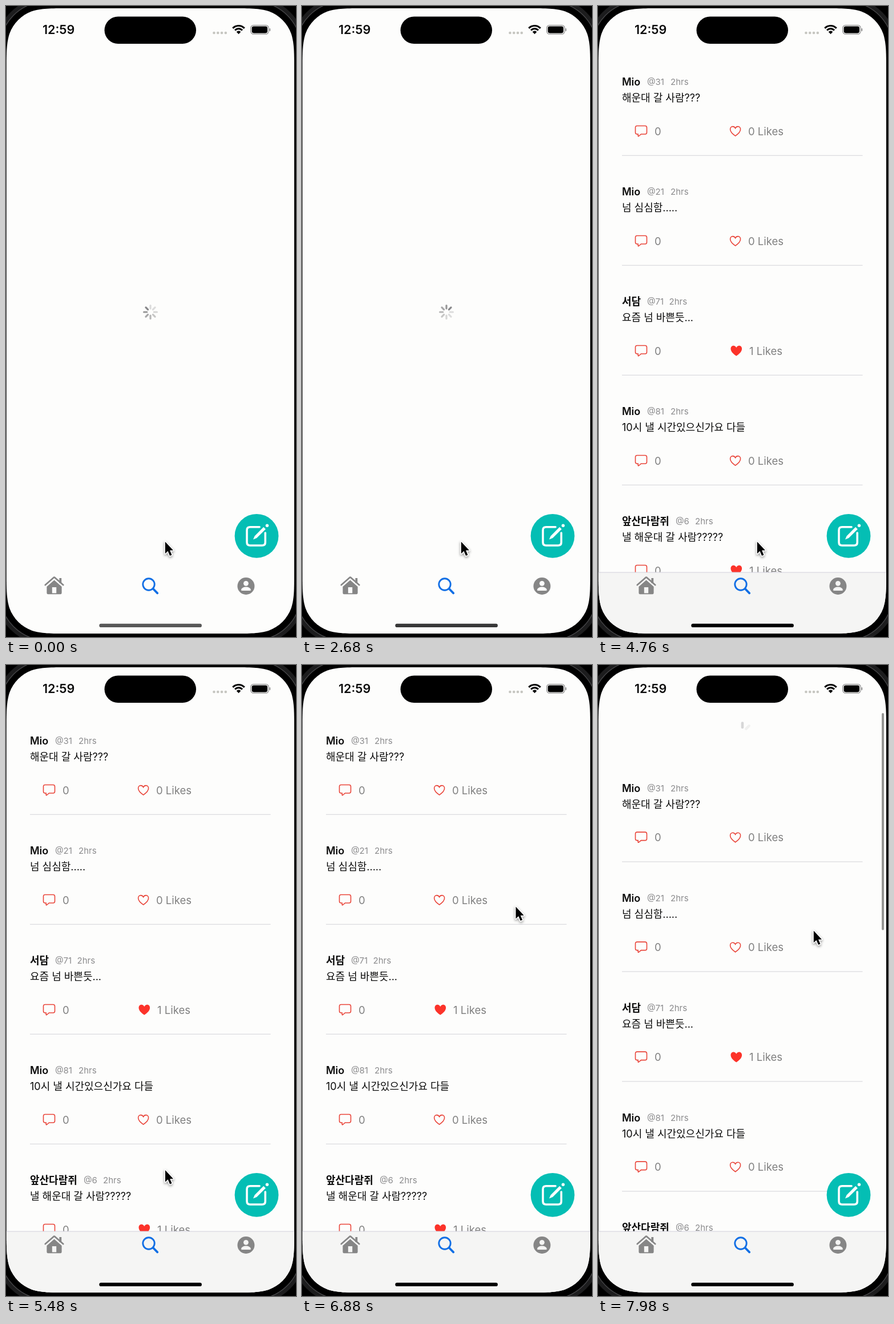
Animation, 508 px wide and 1103 px high, one loop 8000 ms. Source, as an HTML page with a canvas:

```html
<!DOCTYPE html>
<html lang="ko">
<head>
<meta charset="utf-8">
<title>Feed</title>
<style>
html, body { margin: 0; width: 100%; height: 100%; overflow: hidden; background: #000; }
canvas { display: block; width: 508px; height: 1103px; }
</style>
</head>
<body>
<canvas id="stage"></canvas>
<script>
const W = 508, H = 1103, LOOP = 8000;
const LIST_AT = 4500, LOADED_AT = 4060;
const PAPER = '#fdfdfc', GRAY = '#868686', RED = '#e9453a';
const FONT = 'Inter, "Noto Sans CJK KR", "Noto Sans CJK", sans-serif';

const canvas = document.getElementById('stage');
const ctx = canvas.getContext('2d');
const dpr = window.devicePixelRatio || 1;
canvas.width = W * dpr;
canvas.height = H * dpr;

const posts = [
  { name: 'Mio', id: '@31', idX: 86, timeX: 127, text: '해운대 갈 사람???', likes: 0 },
  { name: 'Mio', id: '@21', idX: 86, timeX: 127, text: '넘 심심함.....', likes: 0 },
  { name: '서담', id: '@71', idX: 86, timeX: 124.5, text: '요즘 넘 바쁜듯...', likes: 1 },
  { name: 'Mio', id: '@81', idX: 86, timeX: 127, text: '10시 낼 시간있으신가요 다들', likes: 0 },
  { name: '앞산다람쥐', id: '@6', idX: 136, timeX: 170, text: '낼 해운대 갈 사람?????', likes: 1 }
];

// Keys are [time, value, ...]
const pointerKeys = [
  [0, 278, 935], [4950, 278, 935], [5480, 278, 882], [6280, 357, 503],
  [7000, 377, 405], [7420, 377, 405], [7540, 377, 420], [7980, 377, 463], [8000, 377, 465]
];
const pullKeys = [[0, 0], [7420, 0], [7540, 15], [7980, 82.5], [8000, 85]];

const clamp = (v, a = 0, b = 1) => Math.min(b, Math.max(a, v));

function sample(keys, t) {
  let i = 1;
  while (i < keys.length - 1 && keys[i][0] < t) i++;
  const a = keys[i - 1], b = keys[i];
  const p = clamp((t - a[0]) / (b[0] - a[0]));
  return a.slice(1).map((v, k) => v + (b[k + 1] - v) * p);
}

function box(x, y, w, h, r, color) {
  ctx.beginPath();
  ctx.roundRect(x, y, w, h, r);
  ctx.fillStyle = color;
  ctx.fill();
}

function disc(x, y, r, color) {
  ctx.beginPath();
  ctx.arc(x, y, r, 0, Math.PI * 2);
  ctx.fillStyle = color;
  ctx.fill();
}

function stroke(color, width, path) {
  ctx.strokeStyle = color;
  ctx.lineWidth = width;
  path ? ctx.stroke(path) : ctx.stroke();
}

function label(str, x, y, size, color, weight = 400) {
  ctx.font = `${weight} ${size}px ${FONT}`;
  ctx.fillStyle = color;
  ctx.fillText(str, x, y);
}

// Rectangle with continuous-curvature corners
function softRect(l, t, r, b, radius) {
  const path = new Path2D();
  // (dx, dy) runs into the corner, (-dy, dx) runs out of it
  function corner(x, y, dx, dy) {
    const at = (a, c) => [x - (dx * a + dy * c) * radius, y - (dy * a - dx * c) * radius];
    path.lineTo(...at(1.529, 0));
    path.bezierCurveTo(...at(1.088, 0), ...at(0.868, 0), ...at(0.631, 0.075));
    path.bezierCurveTo(...at(0.373, 0.169), ...at(0.169, 0.373), ...at(0.075, 0.631));
    path.bezierCurveTo(...at(0, 0.868), ...at(0, 1.088), ...at(0, 1.529));
  }
  corner(r, t, 1, 0);
  corner(r, b, 0, 1);
  corner(l, b, -1, 0);
  corner(l, t, 0, -1);
  path.closePath();
  return path;
}

const screen = softRect(0.8, 4, 504.9, 1097, 70.5);
const rim = softRect(-13, -10, 519, 1111, 90);
const frame = softRect(-17, -14, 523, 1115, 94);
const heart = new Path2D('M0 8.3 C-3 6.3 -9 2 -9 -3.2 C-9 -6.3 -7 -8.2 -4.6 -8.2 C-2.5 -8.2 -.9 -7 0 -5.2 C.9 -7 2.5 -8.2 4.6 -8.2 C7 -8.2 9 -6.3 9 -3.2 C9 2 3 6.3 0 8.3 Z');
const bubble = new Path2D('M3.5 0 H17.5 Q20.5 0 20.5 3 V11.5 Q20.5 14.5 17.5 14.5 H10.5 L6.2 18 Q5.2 18.6 5.2 17.3 V14.5 H3.5 Q.5 14.5 .5 11.5 V3 Q.5 0 3.5 0 Z');
const arrow = new Path2D('M0 0 V20.8 L4.7 16.4 L8.2 24.5 L11.6 23 L8.2 15.2 H14.2 Z');

function at(x, y, draw) {
  ctx.save();
  ctx.translate(x, y);
  draw();
  ctx.restore();
}

function drawBezel() {
  ctx.fillStyle = '#000';
  ctx.fillRect(0, 0, W, H);
  stroke('#1d1d1e', 7, frame);
  stroke('#464648', 1.4, rim);
}

function spokes(x, y, r, len, width, alpha) {
  ctx.lineCap = 'round';
  for (let i = 0; i < 8; i++) {
    at(x, y, () => {
      ctx.rotate(i * Math.PI / 4);
      ctx.beginPath();
      ctx.moveTo(0, -r - (len - width) / 2);
      ctx.lineTo(0, -r + (len - width) / 2);
      stroke(`rgba(70,70,72,${alpha(i)})`, width);
    });
  }
}

function drawLoader(t) {
  const head = (7 + Math.floor(t / 100 + 0.1)) % 8;
  spokes(253, 535, 8.8, 8.4, 3.2, i => {
    const age = (head - i + 8) % 8;
    return Math.max(0.18, 0.64 - age * 0.085);
  });
}

function drawPost(post, y) {
  label(post.name, 42, y + 139, 18, '#0a0a0a', 600);
  label(post.id, post.idX, y + 138, 15, '#8b8b8d');
  label('2hrs', post.timeX, y + 138, 15, '#8b8b8d');
  label(post.text, 42, y + 167, 18, '#0a0a0a');

  at(65, y + 209.5, () => stroke(RED, 1.6, bubble));
  label('0', 99, y + 225.5, 18.5, '#808080');

  const liked = post.likes > 0;
  at(liked ? 242.3 : 240.6, y + 218.8, () => {
    if (liked) {
      ctx.scale(1.09, 1.09);
      ctx.fillStyle = '#fc332a';
      ctx.fill(heart);
    } else {
      stroke(RED, 1.6, heart);
    }
  });
  label(post.likes + ' Likes', liked ? 265 : 263, y + 225.5, 18.5, '#808080');

  ctx.fillStyle = '#dadade';
  ctx.fillRect(42, y + 260.7, 421.5, 1.2);
}

function drawList(pull) {
  ctx.save();
  ctx.beginPath();
  ctx.rect(0, 0, W, 990);
  ctx.clip();
  posts.forEach((post, i) => drawPost(post, i * 192 + pull));
  if (pull > 68) {
    spokes(253, 118, 12.7, 12, 4.6, i => clamp((pull - 68) / 70 - i * 0.14));
  }
  ctx.restore();

  ctx.fillStyle = '#f5f5f4';
  ctx.fillRect(0, 990, W, 113);
  ctx.fillStyle = '#d7d6e2';
  ctx.fillRect(0, 989.5, W, 1.2);

  if (pull > 0) {
    ctx.globalAlpha = clamp(pull / 8);
    box(497, 84, 4, 462 - pull, 2, '#949492');
    ctx.globalAlpha = 1;
  }
}

function drawStatus() {
  label('12:59', 64, 49.3, 21.5, '#0a0a0a', 600);
  box(172.5, 18.5, 160.5, 47.5, 23.75, '#000');
  for (let i = 0; i < 4; i++) disc(364.4 + i * 6.8, 47, 2.3, '#c6c6c1');

  ctx.lineCap = 'butt';
  for (const r of [14, 8.8]) {
    ctx.beginPath();
    ctx.arc(407.5, 48.5, r, -Math.PI * 0.76, -Math.PI * 0.24);
    stroke('#050505', 3.2);
  }
  ctx.beginPath();
  ctx.moveTo(407.5, 49.3);
  ctx.arc(407.5, 48.7, 5.2, -Math.PI * 0.76, -Math.PI * 0.24);
  ctx.closePath();
  ctx.fillStyle = '#050505';
  ctx.fill();

  ctx.beginPath();
  ctx.roundRect(428.7, 33.6, 31.4, 15.6, 5);
  stroke('#8f8f8f', 1.3);
  box(430.6, 35.6, 27.4, 11.8, 3.3, '#020202');
  box(461.4, 39, 1.8, 5, 1, '#8f8f8f');
}

function drawTabs(paper) {
  ctx.lineCap = 'round';
  ctx.lineJoin = 'round';

  // Home
  ctx.fillStyle = GRAY;
  ctx.fillRect(93.4, 1000, 3.8, 9);
  ctx.fill(new Path2D('M84.5 1003.6 L97.6 1015 V1026 Q97.6 1028.3 95.3 1028.3 H73.7 Q71.4 1028.3 71.4 1026 V1015 Z'));
  ctx.fillStyle = paper;
  ctx.fillRect(80.8, 1016, 7.4, 10.4);
  stroke(GRAY, 2.8, new Path2D('M68.8 1012 L83.4 999.2 Q84.5 998.3 85.6 999.2 L100.2 1012'));

  // Search
  ctx.beginPath();
  ctx.arc(250, 1011, 10.2, 0, Math.PI * 2);
  stroke('#126fe5', 2.9);
  stroke('#126fe5', 3.8, new Path2D('M258 1019 L265.2 1026.3'));

  // Profile
  disc(420.4, 1014, 15, GRAY);
  disc(420.4, 1009.3, 4.4, paper);
  ctx.fillStyle = paper;
  ctx.fill(new Path2D('M412 1021 C412 1013.6 428.8 1013.6 428.8 1021 Q428.8 1022 427.6 1022 H413.2 Q412 1022 412 1021 Z'));
}

function drawCompose() {
  disc(439, 926.3, 38.4, '#04beb4');
  ctx.lineCap = 'round';
  ctx.lineJoin = 'round';
  stroke('#fff', 3.6, new Path2D('M444 910.8 H427.5 Q422 910.8 422 916.3 V937.5 Q422 943 427.5 943 H448.7 Q454.2 943 454.2 937.5 V921'));
  ctx.fillStyle = '#fff';
  ctx.fill(new Path2D('M433 932.4 L435.6 926.4 L451.2 910.8 L454.8 914.4 L439.2 930 Z'));
  disc(457.4, 908.2, 2.7, '#fff');
}

function drawPointer(x, y) {
  at(x + 0.8, y + 1.4, () => {
    ctx.lineJoin = 'round';
    ctx.save();
    ctx.shadowColor = 'rgba(0,0,0,.4)';
    ctx.shadowBlur = 4 * dpr;
    ctx.shadowOffsetY = 2 * dpr;
    stroke('#fff', 3.4, arrow);
    ctx.restore();
    ctx.fillStyle = '#000';
    ctx.fill(arrow);
  });
}

function draw(t) {
  const listed = t >= LIST_AT;
  const [pull] = sample(pullKeys, t);
  const [px, py] = sample(pointerKeys, t);

  ctx.setTransform(dpr, 0, 0, dpr, 0, 0);
  drawBezel();
  ctx.save();
  ctx.clip(screen);
  ctx.fillStyle = PAPER;
  ctx.fillRect(0, 0, W, H);
  if (t < LOADED_AT) drawLoader(t);
  if (listed) drawList(pull);
  drawStatus();
  drawTabs(listed ? '#f5f5f4' : PAPER);
  drawCompose();
  const tone = Math.round(88 * (1 - clamp((t - 2500) / 500)));
  box(163.3, 1079.8, 179.6, 6.3, 3.15, `rgb(${tone},${tone},${tone})`);
  ctx.restore();
  drawPointer(px, py);
}

const start = performance.now();
function tick() {
  draw((performance.now() - start) % LOOP);
  requestAnimationFrame(tick);
}
tick();
</script>
</body>
</html>
```
